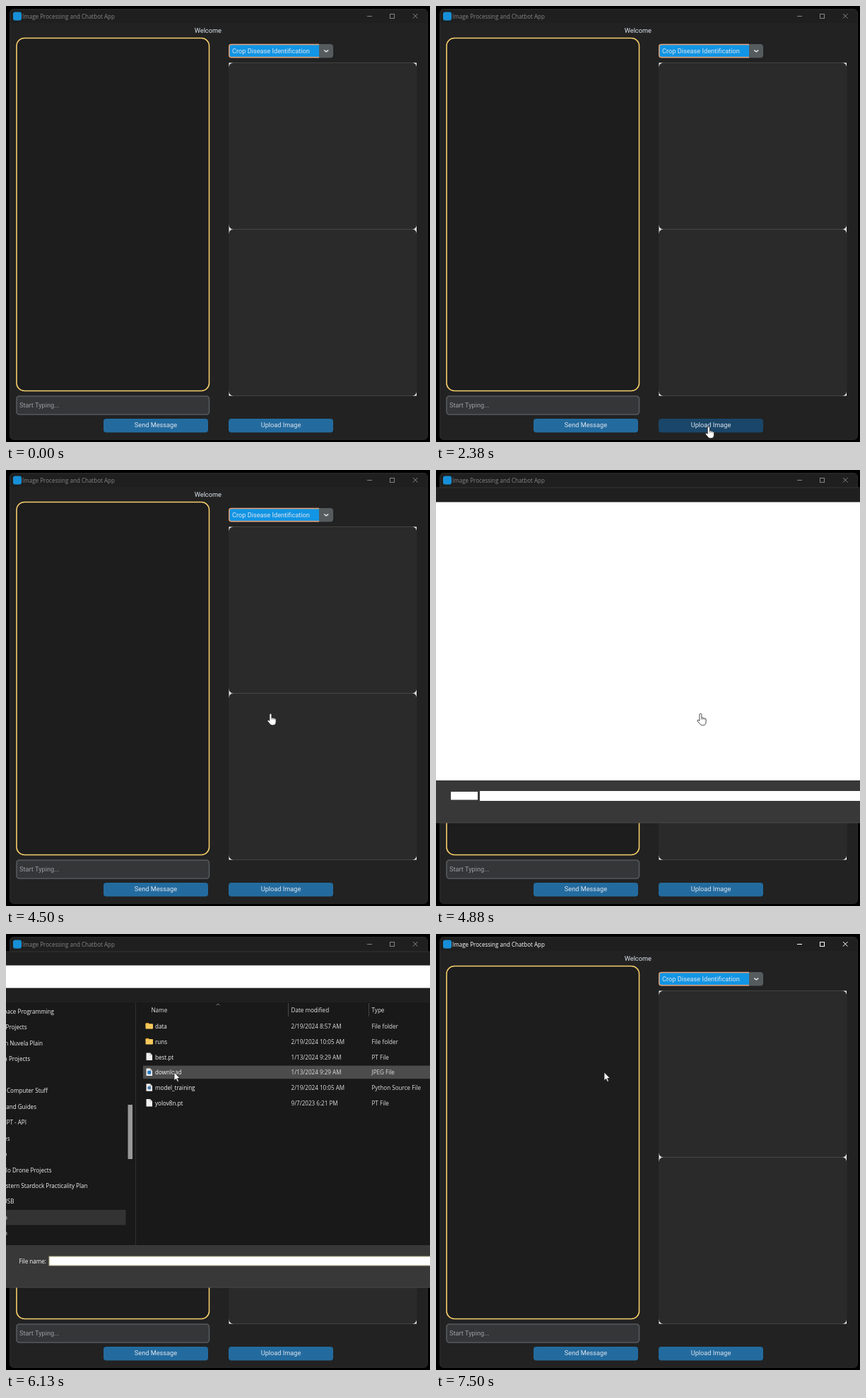
Write an HTML page with a canvas that moves like this. It is 600 px wide and 618 px high and loops after 8 s.

```html
<!DOCTYPE html>
<html lang="en">
<head>
<meta charset="utf-8">
<title>Image Processing and Chatbot App</title>
<style>
  html, body { margin: 0; width: 100%; height: 100%; overflow: hidden; background: #000; }
  canvas { display: block; }
</style>
</head>
<body>
<canvas id="stage" width="600" height="618"></canvas>
<script>
const ctx = document.getElementById('stage').getContext('2d');
const LOOP = 8000, STEP = 125;
const APP_FONT = '9.2px Roboto, sans-serif';
const SYSTEM_FONT = '8.1px "Open Sans", sans-serif';

const HAND = new Path2D('M-1.6 9.5V.8a1.5 1.5 0 0 1 3 0V5.5q1.6-1 2.2.3 1.6-.8 2.1.5 1.9-.4 1.9 1.4V11q0 4.8-4.4 4.8H2Q0 15.8-1 14L-4.4 10q-.6-1.6.8-1.7.9 0 2 1.2z');
const KNUCKLES = new Path2D('M1.4 5.5V8M3.6 5.9V8M5.7 6.5V8.4');
const ARROW = new Path2D('M0 0V11.5L2.7 9.2 4.6 13.4 6.4 12.6 4.6 8.5H8.2z');

// Time of each event in ms
const APPEAR = 2125, HOVER = 2250, PRESS = 3750, OPEN = 4750, LISTED = 5000, SIDEBAR = 5625, CLOSE = 6875;

// Cursor tip: time, x, y
const cursorKeys = [
  [2125, 412, 540], [2250, 386, 597], [2875, 384.5, 597], [3125, 381, 588],
  [3750, 381, 588], [4375, 374.5, 346], [4875, 374.5, 346], [5250, 356, 174],
  [5375, 352, 174], [6000, 238, 196], [8000, 238, 196]
];

const files = [
  ['folder', 'data', '2/19/2024 8:57 AM', 'File folder'],
  ['folder', 'runs', '2/19/2024 10:05 AM', 'File folder'],
  ['page', 'best.pt', '1/13/2024 9:29 AM', 'PT File'],
  ['image', 'download', '1/13/2024 9:29 AM', 'JPEG File'],
  ['code', 'model_training', '2/19/2024 10:05 AM', 'Python Source File'],
  ['page', 'yolov8n.pt', '9/7/2023 6:21 PM', 'PT File']
];
const FILE_TOP = 131, FILE_STEP = 21.8;

// Sidebar labels, cut off at the left, with their right edge
const places = [
  ['pace Programming', 68], ['Projects', 29.5], ['n Nuvela Plain', 52], ['a Projects', 34],
  ['', 0], ['Computer Stuff', 59], ['and Guides', 43], ['PT - API', 29], ['es', 5.5], ['o', 1.5],
  ['lo Drone Projects', 64.5], ['stern Stardock Practicality Plan', 115.5], ['USB', 11.5], ['o', 2], ['o', 2]
];

function rect(x, y, w, h, color) {
  ctx.fillStyle = color;
  ctx.fillRect(x, y, w, h);
}

function box(x, y, w, h, radius, fill, border, width = 1) {
  ctx.beginPath();
  ctx.roundRect(x, y, w, h, radius);
  ctx.fillStyle = fill;
  ctx.fill();
  if (border) stroke(border, width);
}

function stroke(color, width = 1, path) {
  ctx.strokeStyle = color;
  ctx.lineWidth = width;
  path ? ctx.stroke(path) : ctx.stroke();
}

function line(color, width, ...points) {
  ctx.beginPath();
  for (const [x, y] of points) ctx.lineTo(x, y);
  stroke(color, width);
}

function text(label, x, middle, color, font = SYSTEM_FONT, align = 'left') {
  ctx.font = font;
  ctx.fillStyle = color;
  ctx.textAlign = align;
  ctx.fillText(label, x, middle + 3);
}

function button(label, x, fill) {
  box(x, 585, 148, 19.5, 4, fill);
  text(label, x + 74, 594.4, '#dce4ee', APP_FONT, 'center');
}

function drawTitleBar(active) {
  const color = active ? '#fff' : '#858585';
  box(10, 8.5, 12, 12, 3, '#1690d8');
  text('Image Processing and Chatbot App', 23, 14.8, color, '8.05px "Open Sans", sans-serif');
  line(color, 1, [511, 14.5], [518, 14.5]);
  ctx.strokeRect(543.5, 11.5, 6, 6);
  line(color, 1, [576, 11], [582.5, 17.5]);
  line(color, 1, [582.5, 11], [576, 17.5]);
}

function drawApp(active, hovered) {
  rect(0, 0, 600, 618, '#000');
  box(5.5, 4.5, 591, 610, 5, '#222', '#2a2a2a');
  rect(6, 6, 590, 18, '#1f1f1f');
  drawTitleBar(active);
  text('Welcome', 285.8, 35.2, '#dce4ee', APP_FONT, 'center');

  box(15, 45.5, 272.5, 500, 11, '#1d1d1e', '#f5cd69', 1.6);
  box(15, 553, 272.5, 26, 4, '#343638', '#565b5e', 1.6);
  text('Start Typing...', 19, 565.8, '#9b9fa2', APP_FONT);

  box(315, 54, 148, 19.5, 4, '#565b5e');
  box(316, 54.8, 127, 17.8, [3, 0, 0, 3], '#1295e4');
  ctx.beginPath();
  ctx.moveTo(443, 54.6);
  ctx.lineTo(319, 54.6);
  ctx.quadraticCurveTo(315.8, 54.6, 315.8, 58);
  ctx.lineTo(315.8, 69.5);
  ctx.quadraticCurveTo(315.8, 72.8, 319, 72.8);
  ctx.lineTo(443, 72.8);
  stroke('#e8a379', 1.5);
  text('Crop Disease Identification', 320, 63.8, '#dce4ee', APP_FONT);
  line('#e3e8ee', 1.4, [450.2, 62.6], [453.2, 64.8], [456.2, 62.6]);

  for (const y of [80.5, 316.5]) {
    rect(315.5, y, 265.5, 236, '#fff');
    rect(321, y, 254.5, 236, '#2a2a2b');
    rect(315, y + 6, 266.5, 224, '#2a2a2b');
    box(315.5, y, 265.5, 236, 6, '#2a2a2b');
  }

  button('Send Message', 138, '#236b9f');
  button('Upload Image', 315, hovered ? '#1a4669' : '#236b9f');
}

function drawIcon(kind, y) {
  if (kind === 'folder') {
    box(197.5, y - 5, 5, 4, 1, '#d99a2b');
    box(197.5, y - 3.8, 10.5, 7.4, 1, '#f7c95a');
    return;
  }
  ctx.beginPath();
  for (const [dx, dy] of [[0, -6], [5.5, -6], [8.5, -3], [8.5, 4.5], [0, 4.5]]) ctx.lineTo(198.5 + dx, y + dy);
  ctx.fillStyle = '#f1f1f1';
  ctx.fill();
  line('#a5a5a5', 0.7, [204, y - 6], [204, y - 3], [207, y - 3]);
  if (kind === 'image') box(200.3, y - 2.6, 5, 5, 1, '#2578bd');
  if (kind === 'code') box(200.3, y - 2.6, 5, 5, 2.5, '#4d7faa');
}

function drawFiles(cursor) {
  rect(0, 97, 600, 344, '#191919');
  rect(183, 97, 1, 344, '#303030');
  rect(399, 98, 1, 19, '#484848');
  rect(513, 98, 1, 19, '#484848');
  line('#929292', 0.8, [297.5, 101], [300, 99], [302.5, 101]);
  text('Name', 205.5, 108, '#e4e4e4');
  text('Date modified', 403.5, 108, '#e4e4e4');
  text('Type', 517.5, 108, '#e4e4e4');

  const hovered = Math.round((cursor.y - FILE_TOP) / FILE_STEP);
  files.forEach(([kind, name, date, type], i) => {
    const y = FILE_TOP + i * FILE_STEP;
    if (i === hovered) rect(194, y - 9.8, 406, 18.6, '#4c4c4c');
    drawIcon(kind, y);
    text(name, 211, y, '#f5f5f5');
    text(date, 403.5, y, '#dedede');
    text(type, 517.5, y, '#dedede');
  });
}

function drawSidebar() {
  rect(0, 391, 169.5, 21.5, '#333');
  places.forEach(([label, right], i) => text(label, right, 110 + i * 22.45, '#f2f2f2', SYSTEM_FONT, 'right'));
  rect(172.5, 242, 6.5, 77, '#999');
}

function drawDialog(t, cursor) {
  const listed = t >= LISTED;
  const footer = listed ? 441 : 440;
  rect(0, 25, 600, footer + 60 - 25, '#1f1f1f');
  rect(0, 24.5, 600, 1, '#333');
  if (listed) {
    rect(0, 44.5, 600, 32, '#fff');
    drawFiles(cursor);
    if (t >= SIDEBAR) drawSidebar();
  } else {
    rect(0, 45.5, 600, 394.5, '#fff');
  }
  rect(0, footer, 600, 60, '#383838');
  rect(0, footer + 59.5, 600, 1, '#484848');
  if (listed) {
    text('File name:', 57, 463.8, '#fff', SYSTEM_FONT, 'right');
    rect(60.5, 456.5, 540, 14, '#a8a477');
    rect(61.5, 457.5, 539, 12, '#fff');
  } else {
    rect(21, 456, 38, 11.5, '#fff');
    rect(62, 455, 538, 14, '#fff');
  }
}

function cursorAt(t) {
  const next = Math.max(1, cursorKeys.findIndex(key => key[0] > t));
  const [t0, x0, y0] = cursorKeys[next - 1], [t1, x1, y1] = cursorKeys[next];
  const p = Math.min(1, Math.max(0, (t - t0) / (t1 - t0)));
  const eased = p * p * (3 - 2 * p);
  return { x: x0 + (x1 - x0) * eased, y: y0 + (y1 - y0) * eased };
}

function drawCursor(t, { x, y }) {
  const hand = t >= HOVER && t < LISTED;
  const shape = hand ? HAND : ARROW;
  ctx.save();
  ctx.translate(x, y);
  ctx.fillStyle = '#fff';
  ctx.fill(shape);
  stroke('#202020', 0.8, shape);
  if (hand) stroke('#333', 0.6, KNUCKLES);
  ctx.restore();
}

function draw(now) {
  const t = Math.floor((now % LOOP) / STEP) * STEP;
  const cursor = cursorAt(t);
  drawApp(t >= CLOSE, t >= HOVER && t < PRESS);
  if (t >= OPEN && t < CLOSE) drawDialog(t, cursor);
  if (t >= APPEAR) drawCursor(t, cursor);
}

let start;
function tick(now) {
  start ??= now;
  draw(now - start);
  requestAnimationFrame(tick);
}
requestAnimationFrame(tick);
</script>
</body>
</html>
```
